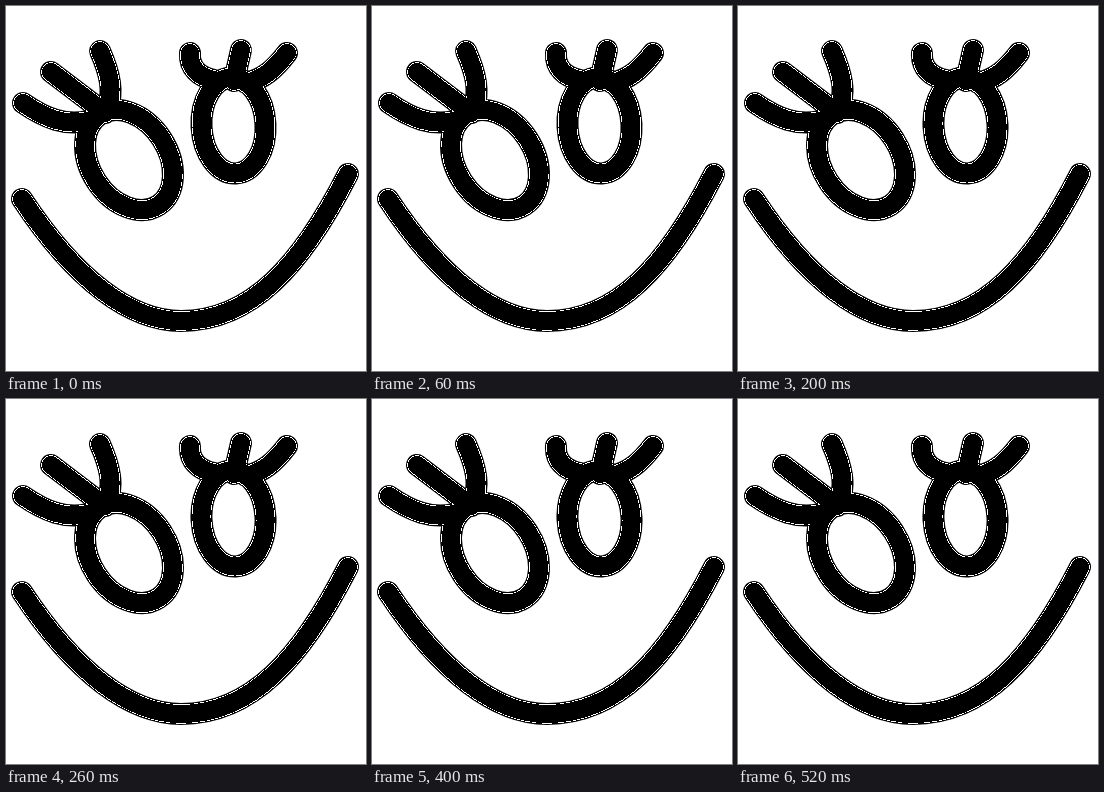
Animation of 360x365 px, one loop 0.6 s. Source, as an HTML page:

```html
<!DOCTYPE html>
<html lang="en">
<head>
<meta charset="utf-8">
<title>Blinking smile</title>
<style>
  html, body { margin: 0; height: 100%; overflow: hidden; background: #fff; }
  svg { display: block; }
  path { fill: none; stroke-linecap: round; stroke-linejoin: round; }
</style>
</head>
<body>
<svg id="face" width="360" height="365" viewBox="0 0 360 365"></svg>
<script>
const face = document.getElementById('face');

// Closed ellipse as path data
const ring = (cx, cy, rx, ry, tilt) => {
  const a = tilt * Math.PI / 180, dx = rx * Math.cos(a), dy = rx * Math.sin(a);
  const arc = `A${rx} ${ry} ${tilt} 0 1 `;
  return `M${cx - dx} ${cy - dy}${arc}${cx + dx} ${cy + dy}${arc}${cx - dx} ${cy - dy}Z`;
};
const smile = (x, y) =>
  `M${16 + x} ${193 + y}c54 82 109 122 159 122c70 0 120-55 167-147`;

const poses = {
  open: [
    ring(123, 154, 54, 39, 57),
    'M17 97C40 113 60 120 82 115',
    'M45 66L99 107',
    'M94 45C105 70 107 85 102 103',
    ring(227.5, 119.5, 48, 32, 87),
    'M184 47C183 62 193 71 208 74',
    'M235 44L228 75',
    'M281 47C268 64 257 73 240 77',
    smile(0, 0).replace('c70 0 120-55 167-147', 'c70 0 120-55 167-147')
  ],
  closed: [
    'M64 116Q105 154 145 116',
    'M45 143C58 143 70 140 82 128',
    'M103 167L105 135',
    'M157 168C140 155 132 140 128 128',
    'M208 116C228 132 262 132 285 109',
    'M195 155C205 146 214 134 219 122',
    'M245 164L249 130',
    'M306 146C295 142 288 130 286 110',
    smile(1, 2)
  ]
};

// Stacked strokes merge the lines and leave a thin broken white seam inside the edge
const layers = [['#000', 22, 'auto'], ['#fff', 19.5, 'crispEdges'], ['#000', 18.1, 'crispEdges']];

for (const [name, lines] of Object.entries(poses)) {
  const d = lines.join('');
  face.innerHTML += `<g id="${name}">` + layers.map(([color, width, edge]) =>
    `<path d="${d}" stroke="${color}" stroke-width="${width}" shape-rendering="${edge}"/>`
  ).join('') + '</g>';
}

const groups = Object.keys(poses).map(name => document.getElementById(name));
const start = performance.now();

function draw(now) {
  const step = Math.floor(Math.max(0, now - start) % 600 / 100);
  const shut = step === 1 || step === 3;
  groups[0].style.display = shut ? 'none' : '';
  groups[1].style.display = shut ? '' : 'none';
  requestAnimationFrame(draw);
}
draw(start);
</script>
</body>
</html>
```
